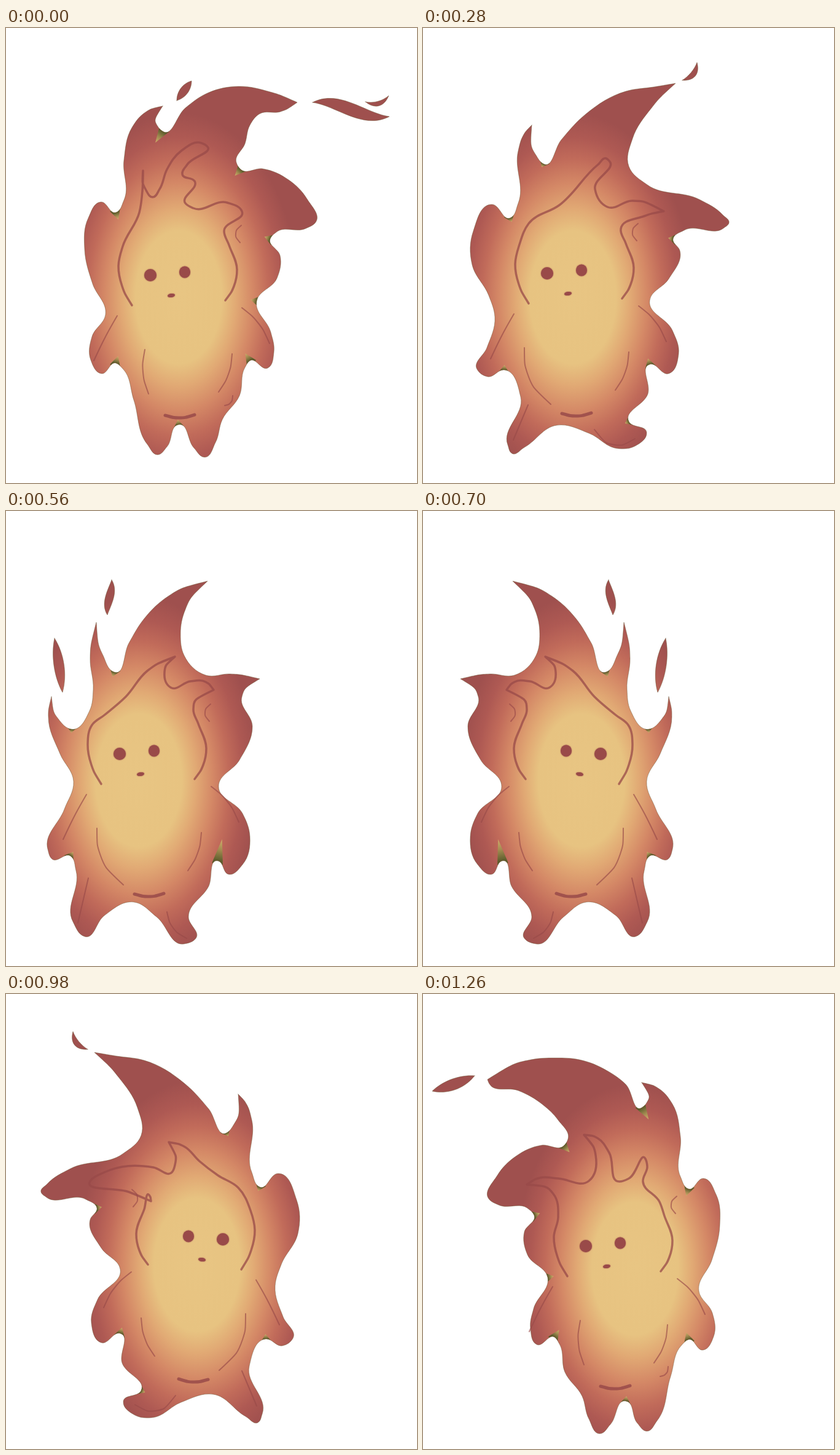
Recreate the animation shown at these times as an HTML page with a canvas. Size 669 px wide and 740 px high, loop 1400 ms.

```html
<!DOCTYPE html>
<html lang="en">
<head>
<meta charset="utf-8">
<title>Flame spirit</title>
<style>
html, body { margin: 0; width: 100%; height: 100%; overflow: hidden; background: #fff; }
canvas { display: block; }
</style>
</head>
<body>
<canvas id="stage" width="669" height="740"></canvas>
<script>
const ctx = document.getElementById('stage').getContext('2d');
const STEP = 140;
const INK = '#994a49';

// Smooth curve through "x,y" points. "|" makes the point before it a corner;
// a third value marks a notch with a shaded wedge of that depth.
function curve(text, closed) {
  const path = new Path2D(), notches = [];
  const parts = text.split('|').map(s => s.trim().split(/\s+/).map(p => p.split(',').map(Number)));
  const first = parts[0][0];
  path.moveTo(...first);
  let last = null;
  parts.forEach((pts, n) => {
    if (last) pts.unshift(last);
    if (closed && n === parts.length - 1) pts.push(first);
    last = pts[pts.length - 1];
    spline(path, pts, notches);
  });
  if (closed) path.closePath();
  return { path, notches };
}

// Tangents weigh the nearer neighbour more; handles follow the chord length.
function spline(path, pts, notches) {
  const dir = pts.map((p, i) => {
    const a = pts[i - 1], b = pts[i + 1];
    if (!a || !b) return null;
    const la = Math.hypot(p[0] - a[0], p[1] - a[1]);
    const lb = Math.hypot(b[0] - p[0], b[1] - p[1]);
    const [x, y] = [0, 1].map(k => (p[k] - a[k]) / la * lb + (b[k] - p[k]) / lb * la);
    const l = Math.hypot(x, y) || 1;
    if (p[2]) notches.push({ p, t: [x / l, y / l], depth: p[2] });
    return [x / l, y / l];
  });
  for (let i = 0; i < pts.length - 1; i++) {
    const [px, py] = pts[i], [qx, qy] = pts[i + 1];
    const h = Math.hypot(qx - px, qy - py) * 0.36;
    const c = dir[i] && [px + dir[i][0] * h, py + dir[i][1] * h];
    const d = dir[i + 1] && [qx - dir[i + 1][0] * h, qy - dir[i + 1][1] * h];
    path.bezierCurveTo(...(c || d || [px, py]), ...(d || c || [qx, qy]), qx, qy);
  }
}

// Loose spark from a to b; turn = -1 bends it into an S.
function spark(ax, ay, bx, by, width, bend = 0, turn = 1) {
  const dx = bx - ax, dy = by - ay, l = Math.hypot(dx, dy);
  const at = (k, off) => `${ax + dx * k - dy / l * off} ${ay + dy * k + dx / l * off}`;
  return new Path2D(`M${ax} ${ay}
    C${at(0.3, bend - width)} ${at(0.7, bend * turn - width)} ${bx} ${by}
    C${at(0.7, bend * turn + width)} ${at(0.3, bend + width)} ${ax} ${ay}Z`);
}

function shape(outline, ...sparks) {
  const s = curve(outline, true);
  sparks.forEach(p => s.path.addPath(p));
  return s;
}

// Outlines run clockwise: hair first, then right side, legs and left side.
const standing = (crest, ...sparks) => shape(
  `255,127 | 247,160 255,168,22 ${crest} 375,219 382,230,14 418,229 460,247 490,278 504,316
  488,326 440,332 430,343,10 446,370 441,407 408,444,10 431,495 436,527 426,553 397,541,14 389,552
  380,598 352,637 341,674 323,698 306,683 281,645,8 262,681 247,694 230,677 208,605
  190,554 179,545,12 155,562 138,540 140,502 162,466 141,416 128,360 134,309 154,283
  179,300,12 192,280 192,215 205,162 227,137`, ...sparks);

const stepping = (hair, cheek, ...sparks) => shape(
  `${hair} 325,267 365,265 413,273 | 384,302 401,350 380,405 346,448 385,492 397,530 385,575 363,591
  345,569,36 330,610 297,660 309,695 290,704 245,660 208,636 160,658 128,692 109,668
  114,585 105,561,8 75,566 68,550 95,485 110,440 ${cheek}`, ...sparks);

const shortCrest = '292,130 330,105 378,95 430,104 474,121 | 447,136 412,140 397,158 389,188';
const longCrest = '281,130 311,108 356,90 396,87 436,90 506,122 | 503,129 456,140 416,163 391,188';
const farSpark = spark(527, 116, 596, 141, 12, 2);

const frontShape = standing(shortCrest, spark(278, 118, 302, 86, 9),
  spark(499, 121, 624, 144, 14, -16, -1), spark(585, 120, 623, 110, 5, 11));
const turnShape = standing(shortCrest, farSpark);
const backShape = standing(longCrest, farSpark);

const strideShape = shape(
  `177,158 | 184,207 196,221,6 225,182 265,140 330,103 375,96 411,90 | 372,130 341,180 335,225 365,255
  450,279 488,304 498,317 490,325 425,329 407,343,8 418,362 400,408 369,443 406,492 416,530 400,562
  369,547,10 366,595 335,640,7 364,658 345,680 318,684 270,659 218,646 165,682 145,692 138,678
  159,600 132,556,8 105,567 88,555 104,520 117,470 107,435 80,385 82,330 112,287
  142,309,7 155,285 155,200 163,175`, spark(422, 85, 446, 56, 6, 10));

const riseShape = stepping(
  `82,284 | 95,323 109,333,7 122,323 133,288 135,188 144,168 156,158 | 164,211 176,220,7 197,190
  227,155 267,123 317,102 362,94 | 332,123 310,158 300,198 304,240`, '82,405 60,338 68,303');
const leanShape = stepping(
  `74,302 | 85,338 107,355,6 136,325 142,290 137,240 147,181 | 158,235 176,262,8 200,215
  225,175 265,138 328,114 | 292,160 284,200 290,235`, '88,395 69,335',
  spark(172, 112, 165, 169, 9, -5, -1), spark(79, 207, 92, 295, 11, -1));

// Every line below is measured from the mouth.
const leftCheek = '-64,16 -80,-15 -86,-48 -79,-80';
const rightCheek = '86,-105 94,-82 107,-42 102,-15 88,8';
const headLine = hair => curve(`${leftCheek} ${hair} ${rightCheek}`).path;
const lines = list => list.map(s => curve(s).path);

const frontHair = headLine(`-52,-135 -47,-170 -46,-203 | -42,-173 -30,-160 -19,-173 -7,-205 16,-235
  49,-248 58,-243 26,-213 18,-197 38,-186 23,-150 36,-142 91,-151 115,-137`);
const strideHair = headLine('-64,-114 -14,-144 49,-210 62,-220 67,-216 44,-170 64,-141 104,-151 156,-134 | 124,-126');
const turnedHair = headLine('-59,-117 -26,-137 4,-160 29,-184 54,-191 | 44,-154 49,-142 79,-150 159,-142 181,-129 119,-110 83,-95 |');
const leanHair = headLine('-59,-96 -24,-126 11,-168 56,-191 | 39,-166 49,-141 81,-151 106,-150 119,-137 |');
const backHair = headLine(`-87,-118 -130,-133 | -109,-144 -79,-143 -29,-139 -18,-181 -37,-214 |
  -14,-208 4,-185 21,-138 36,-143 63,-175 66,-163 59,-138`);

const common = lines(['114,-114 105,-101 112,-86', '-88,33 -106,65 -126,106', '115,20 140,43 160,78', '99,95 93,128 77,157']);
const smile = curve('-10,195 13,199 38,194').path;
const still = lines(['-43,88 -46,125 -37,160', '100,163 96,175 87,179']);
const belly = '-71,88 -66,130 -28,180';
const stride = lines([belly, '-65,181 -89,238', '43,221 76,246 109,236']);
const step = lines([belly, '-85,169 -102,242', '43,224 53,250 75,267']);

// x, y place the outline; glow is the warm centre on the stage.
const base = { x: 0, y: 0, squeeze: 1, flip: 1, faceFlip: 1 };
const front = { ...base, shape: frontShape, hair: frontHair, legs: still, mouth: [269, 435], glow: 281 };
const turn = { ...front, shape: turnShape, x: -4, y: 5, squeeze: 0.94, mouth: [252, 438], glow: 262 };
const side = { ...base, shape: strideShape, hair: strideHair, legs: stride, mouth: [236, 432], glow: 244 };
const lean = { ...base, shape: leanShape, hair: leanHair, legs: step, mouth: [219, 428], glow: 216 };
const rise = { ...lean, shape: riseShape, x: 8, mouth: [217, 428], glow: 221 };

function mirror(pose, sum, y, change) {
  const [mx, my] = pose.mouth;
  return { ...pose, x: sum - pose.x, y: pose.y + y, flip: -1, faceFlip: -1, mouth: [sum - mx, my], glow: sum - pose.glow, ...change };
}

const cycle = [
  front, turn, side, rise, lean,
  mirror(lean, 474, 0), mirror(rise, 490, 2), mirror(side, 555, 5, { hair: turnedHair }), mirror(turn, 598, 5),
  mirror(front, 611, 17, { shape: backShape, hair: backHair, mouth: [299, 443], faceFlip: 1, glow: 345 })
];

function ramp(gradient, stops) {
  stops.forEach(([at, color]) => gradient.addColorStop(at, color));
  return gradient;
}

const heat = ramp(ctx.createRadialGradient(0, 0, 0, 0, 0, 1), [
  [0, '#e8c583'], [0.36, '#e7c381'], [0.48, '#e1a974'], [0.62, '#d48866'],
  [0.75, '#c16b5a'], [0.87, '#ae5953'], [1, '#9f504e']
]);

function drawNotch({ p: [x, y], t: [tx, ty], depth }) {
  const at = (along, inward) => [x + tx * along - ty * inward, y + ty * along + tx * inward];
  const tip = at(0, depth);
  ctx.fillStyle = ramp(ctx.createLinearGradient(...tip, x, y), [[0, '#d3ae6c'], [0.5, '#a18a50'], [1, '#5c5c2c']]);
  ctx.beginPath();
  ctx.moveTo(...tip);
  ctx.lineTo(...at(9, -5));
  ctx.lineTo(...at(-9, -5));
  ctx.fill();
}

function drawBody({ shape: { path, notches }, x, y, squeeze, flip, glow }) {
  ctx.save();
  ctx.transform(flip * squeeze, 0, 0, 1, x, y);
  ctx.save();
  ctx.clip(path);
  ctx.save();
  ctx.setTransform(195, 0, 0, 300, glow, 438 + y / 2);
  ctx.fillStyle = heat;
  ctx.fillRect(-5, -5, 10, 10);
  ctx.restore();
  notches.forEach(drawNotch);
  ctx.restore();
  ctx.strokeStyle = 'rgba(100,78,44,.45)';
  ctx.lineWidth = 1;
  ctx.stroke(path);
  ctx.restore();
}

function stroke(path, width, alpha) {
  ctx.globalAlpha = alpha;
  ctx.lineWidth = width;
  ctx.stroke(path);
}

function spot(x, y, rx, ry, tilt = 0) {
  ctx.beginPath();
  ctx.ellipse(x, y, rx, ry, tilt, 0, Math.PI * 2);
  ctx.fill();
}

function drawFace({ hair, legs, mouth, faceFlip }) {
  ctx.save();
  ctx.transform(faceFlip, 0, 0, 1, ...mouth);
  ctx.strokeStyle = ctx.fillStyle = ctx.shadowColor = INK;
  stroke(hair, 3.5, 0.75);
  [...common, ...legs].forEach(p => stroke(p, 2, 0.65));
  stroke(smile, 5, 0.85);
  ctx.globalAlpha = 1;
  ctx.shadowBlur = 2;
  spot(-34, -33, 10, 10);
  spot(22, -38, 9, 9.5);
  spot(0, 0, 6, 3, -0.15);
  ctx.restore();
}

function draw(pose) {
  ctx.fillStyle = '#fff';
  ctx.fillRect(0, 0, 669, 740);
  ctx.lineCap = ctx.lineJoin = 'round';
  drawBody(pose);
  drawFace(pose);
}

const start = performance.now();
function tick() {
  const t = performance.now() - start;
  draw(cycle[Math.floor(t / STEP) % cycle.length]);
  requestAnimationFrame(tick);
}
tick();
</script>
</body>
</html>
```
